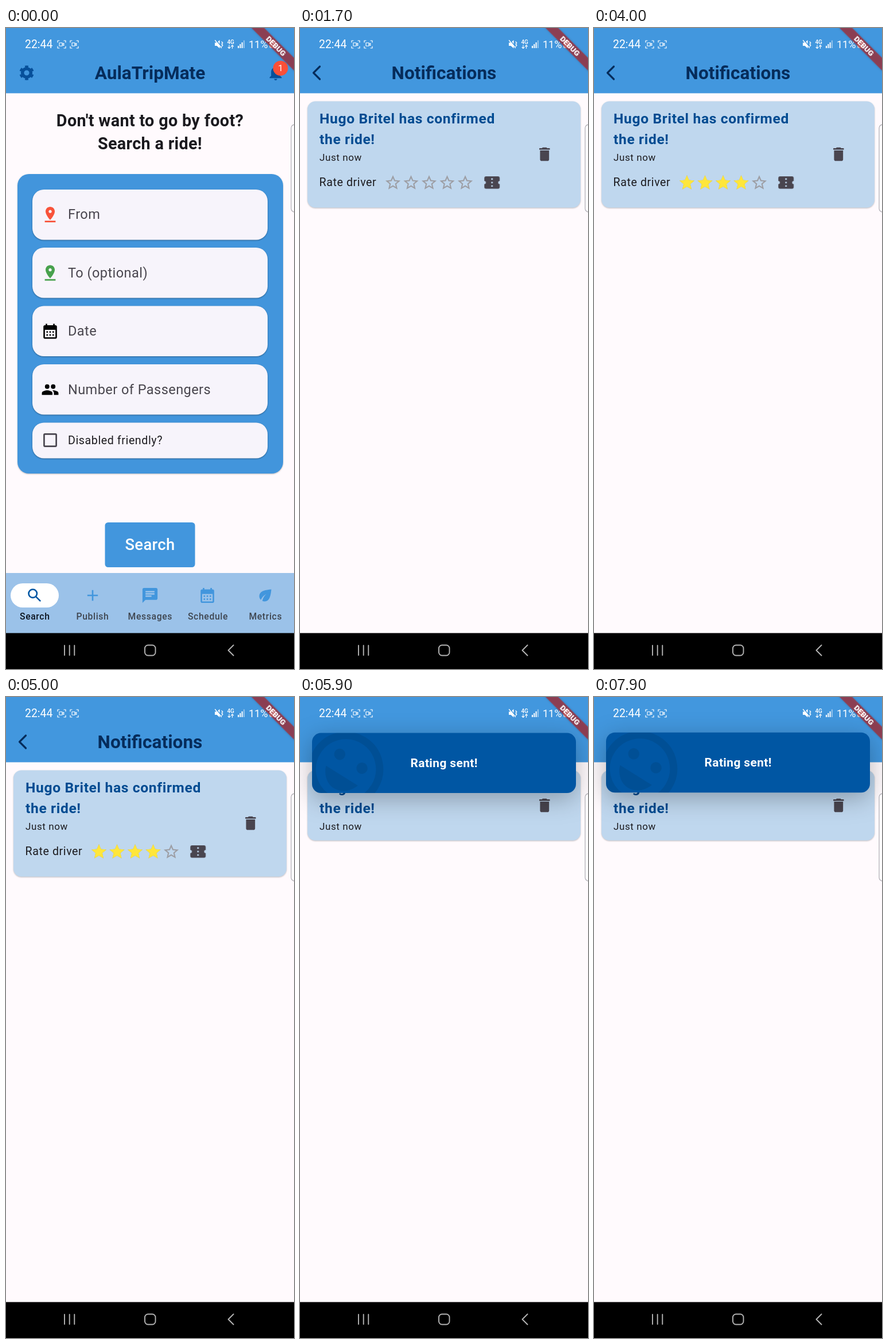
Recreate the animation shown at these times as an HTML page. Size 502 px wide and 1115 px high, loop 8000 ms.

```html
<!DOCTYPE html>
<html lang="en">
<head>
<meta charset="utf-8">
<title>Ride notifications</title>
<style>
html, body { margin: 0; width: 100%; height: 100%; overflow: hidden; background: #fffafd; }
svg { display: block; }
text { font-family: Roboto, sans-serif; white-space: pre; }
.mid { text-anchor: middle; }
.page { fill: #fffafd; }
.title { font-size: 31.6px; font-weight: 700; fill: #062c5b; }
.lead { font-size: 28.75px; font-weight: 700; fill: #1b1a1f; letter-spacing: .33px; }
.label { font-size: 23.5px; fill: #49464e; letter-spacing: .45px; }
.tab { font-size: 15.7px; font-weight: 500; fill: #3f4650; letter-spacing: .65px; }
.news { font-size: 24.6px; font-weight: 700; fill: #004b91; letter-spacing: .65px; }
.note { font-size: 19.6px; fill: #1c1b1f; letter-spacing: .6px; }
.when { font-size: 17px; fill: #1c1b1f; letter-spacing: .6px; }
.field { fill: #f7f4fb; filter: drop-shadow(0 1.3px 1.2px rgba(0,0,0,.35)); }
.card { fill: #bfd7ee; filter: drop-shadow(0 1px 1.2px rgba(0,0,0,.25)); }
.line { fill: none; stroke-linecap: round; stroke-linejoin: round; }

#ripple, #notices, #rated, #fullCard, #shortCard { animation: 8s infinite step-end; }
#ripple { animation-name: ripple; animation-timing-function: linear; opacity: 0; }
#notices { animation-name: enter; transform-origin: 251px 557px; }
#rated { animation-name: rated; }
#fullCard { animation-name: full; }
#shortCard { animation-name: short; }
#blink { animation: blink 1s infinite step-end; }
@keyframes ripple { 0%, 15% { opacity: 0; } 16.2%, 18% { opacity: 1; } 20%, 100% { opacity: 0; } }
@keyframes enter {
  0% { opacity: 0; transform: scale(.85); animation-timing-function: step-end; }
  17.6% { opacity: 0; transform: scale(.85); animation-timing-function: cubic-bezier(.05,.7,.1,1); }
  21.1%, 100% { opacity: 1; transform: none; }
}
@keyframes rated { 0% { opacity: 0; } 32.4%, 100% { opacity: 1; } }
@keyframes full { 0% { opacity: 1; } 66.1%, 100% { opacity: 0; } }
@keyframes short { 0% { opacity: 0; } 69.9%, 100% { opacity: 1; } }
@keyframes blink { 0% { opacity: 1; } 10% { opacity: 0; } 60%, 100% { opacity: 1; } }
</style>
</head>
<body>
<svg width="502" height="1115" viewBox="0 0 502 1115">
<defs>
  <g id="gear" fill="none" stroke="#07509a" transform="scale(1.31) translate(-12 -12)">
    <circle cx="12" cy="12" r="5.6" stroke-width="4.2"/>
    <circle cx="12" cy="12" r="8.1" stroke-width="3.2" pathLength="12" stroke-dasharray="1 1" transform="rotate(-105 12 12)"/>
  </g>
  <path id="bell" transform="scale(1.31) translate(-12 -12)" d="M12 22c1.1 0 2-.9 2-2h-4c0 1.1.89 2 2 2zm6-6v-5c0-3.07-1.64-5.64-4.5-6.32V4c0-.83-.67-1.5-1.5-1.5s-1.5.67-1.5 1.5v.68C7.63 5.36 6 7.92 6 11v5l-2 2v1h16v-1l-2-2z"/>
  <path id="pin" transform="scale(1.34) translate(-12 -12)" d="M18 8c0-3.31-2.69-6-6-6S6 4.69 6 8c0 4.5 6 11 6 11s6-6.5 6-11zm-8 0c0-1.1.9-2 2-2s2 .9 2 2-.89 2-2 2-2-.9-2-2zM5 20v2h14v-2H5z"/>
  <path id="calendar" transform="scale(1.31) translate(-12 -12)" d="M19 4h-1V2h-2v2H8V2H6v2H5c-1.1 0-2 .9-2 2v14c0 1.1.9 2 2 2h14c1.1 0 2-.9 2-2V6c0-1.1-.9-2-2-2zm0 16H5V10h14zM9 14H7v-2h2zm4 0h-2v-2h2zm4 0h-2v-2h2zm-8 4H7v-2h2zm4 0h-2v-2h2zm4 0h-2v-2h2z"/>
  <path id="people" transform="scale(1.31) translate(-12 -12)" d="M16 11a3 3 0 1 0 0-6 3 3 0 0 0 0 6zm-8 0a3 3 0 1 0 0-6 3 3 0 0 0 0 6zm0 2c-2.33 0-7 1.17-7 3.5V19h14v-2.5c0-2.33-4.67-3.5-7-3.5zm8 0c-.29 0-.62.02-.97.05 1.16.84 1.97 1.97 1.97 3.45V19h6v-2.5c0-2.33-4.67-3.5-7-3.5z"/>
  <path id="lens" class="line" stroke="#0056a3" stroke-width="2" transform="scale(1.31) translate(-12 -12)" d="M4 9.5a5.5 5.5 0 1 0 11 0a5.5 5.5 0 1 0-11 0M14 14l5.2 5.2"/>
  <path id="plus" transform="scale(1.31) translate(-12 -12)" d="M19 13h-6v6h-2v-6H5v-2h6V5h2v6h6z"/>
  <path id="chat" transform="scale(1.31) translate(-12 -12)" d="M20 2H4c-1.1 0-2 .9-2 2v18l4-4h14c1.1 0 2-.9 2-2V4c0-1.1-.9-2-2-2zM6 9h12v2H6zm8 5H6v-2h8zm4-6H6V6h12z"/>
  <path id="leaf" transform="scale(1.31) translate(-12 -12)" d="M6.05 8.05c-2.73 2.73-2.73 7.15-.02 9.88 1.47-3.4 4.09-6.24 7.36-7.93-2.77 2.34-4.71 5.61-5.39 9.32 2.6 1.23 5.8.78 7.95-1.37C19.43 14.47 20 4 20 4S9.53 4.57 6.05 8.05z"/>
  <path id="bin" fill="#49454f" transform="scale(1.31) translate(-12 -12)" d="M6 19c0 1.1.9 2 2 2h8c1.1 0 2-.9 2-2V7H6zM19 4h-3.5l-1-1h-5l-1 1H5v2h14z"/>
  <path id="ticket" fill="#49454f" transform="scale(1.34) translate(-12 -12)" d="M22 10V6c0-1.1-.9-2-2-2H4c-1.1 0-2 .9-2 2v4a2 2 0 0 1 0 4v4c0 1.1.9 2 2 2h16c1.1 0 2-.9 2-2v-4a2 2 0 0 1 0-4zm-9 7.5h-2v-2h2zm0-4.5h-2v-2h2zm0-4.5h-2v-2h2z"/>
  <path id="star" transform="scale(1.31) translate(-12 -12)" d="M12 17.27L18.18 21l-1.64-7.03L22 9.24l-7.19-.61L12 2 9.19 8.63 2 9.24l5.46 4.73L5.82 21z"/>
  <path id="starLine" transform="scale(1.31) translate(-12 -12)" d="M22 9.24l-7.19-.62L12 2 9.19 8.63 2 9.24l5.46 4.73L5.82 21 12 17.27 18.18 21l-1.63-7.03zM12 15.4l-3.76 2.27 1-4.28-3.32-2.88 4.38-.38L12 6.1l1.71 4.04 4.38.38-3.32 2.88 1 4.28z"/>
  <path id="corners" class="line" stroke="#fff" stroke-width="1.2" d="M-7-3.5V-6.5H-4M4-6.5H7V-3.5M7 3.5V6.5H4M-4 6.5H-7V3.5"/>
  <path id="camera" class="line" stroke="#fff" stroke-width="1.1" d="M-4-2.7H1V2.7H-4zM1-.5L3.8-2V2L1 .5"/>
  <g id="news">
    <text class="news" x="34" y="166">Hugo Britel has confirmed</text>
    <text class="news" x="34" y="202">the ride!</text>
    <text class="when" x="34" y="231">Just now</text>
  </g>
  <clipPath id="snackClip"><rect width="460" height="104.5" rx="15.5"/></clipPath>
</defs>

<g id="search">
  <rect class="page" width="502" height="1115"/>
  <rect width="502" height="113.5" fill="#4297de"/>
  <use href="#gear" x="36" y="78"/>
  <text class="title mid" x="251" y="89">AulaTripMate</text>
  <circle id="ripple" cx="470" cy="78" r="25" fill="#003" fill-opacity=".07"/>
  <use href="#bell" x="470" y="78" fill="#07509a"/>
  <circle cx="478.5" cy="70" r="13" fill="#fb5038"/>
  <text class="mid" x="478.5" y="75" font-size="15.5" fill="#fff">1</text>

  <text class="lead mid" x="251" y="171">Don't want to go by foot?</text>
  <text class="lead mid" x="251" y="211">Search a ride!</text>

  <rect x="20" y="254" width="463" height="521" rx="20" fill="#4295dc" style="filter:drop-shadow(0 1px 1px rgba(0,0,0,.25))"/>
  <g class="field">
    <rect x="46" y="281" width="410" height="87.5" rx="20"/>
    <rect x="46" y="382" width="410" height="87.5" rx="20"/>
    <rect x="46" y="483.5" width="410" height="87.5" rx="20"/>
    <rect x="46" y="585" width="410" height="87.5" rx="20"/>
    <rect x="46" y="686.5" width="410" height="62" rx="20"/>
  </g>
  <use href="#pin" x="77" y="324.5" fill="#f8533a"/>
  <use href="#pin" x="77" y="426" fill="#48a14d"/>
  <use href="#calendar" x="77" y="527.5"/>
  <use href="#people" x="77" y="629"/>
  <rect x="66.4" y="706.4" width="21.2" height="21.2" rx="1.5" fill="none" stroke="#49454f" stroke-width="2.7"/>
  <text class="label" x="108" y="332">From</text>
  <text class="label" x="108" y="434">To (optional)</text>
  <text class="label" x="108" y="535">Date</text>
  <text class="label" x="108" y="637">Number of Passengers</text>
  <text class="note" x="108" y="724">Disabled friendly?</text>

  <rect x="172.5" y="860" width="157" height="78" rx="5.5" fill="#4296dd"/>
  <text class="mid" x="251" y="908" font-size="27.4" font-weight="500" fill="#fff" letter-spacing=".33">Search</text>

  <rect y="948" width="502" height="105" fill="#9bc2e9"/>
  <rect x="8" y="966" width="84" height="42" rx="21" fill="#fff"/>
  <use href="#lens" x="50" y="987"/>
  <g fill="#4296dd">
    <use href="#plus" x="151" y="987"/>
    <use href="#chat" x="251" y="987"/>
    <use href="#calendar" x="351" y="987"/>
    <use href="#leaf" x="452" y="987"/>
  </g>
  <g class="mid">
    <text class="tab" x="50.3" y="1029" style="fill:#0c1420">Search</text>
    <text class="tab" x="151" y="1029">Publish</text>
    <text class="tab" x="251.3" y="1029">Messages</text>
    <text class="tab" x="352" y="1029">Schedule</text>
    <text class="tab" x="452.3" y="1029">Metrics</text>
  </g>
</g>

<g id="notices">
  <rect class="page" width="502" height="1115"/>
  <rect width="502" height="113.5" fill="#4297de"/>
  <path class="line" d="M34.5 67L23.5 78l11 11" stroke="#062c5b" stroke-width="3.2"/>
  <text class="title mid" x="251" y="89">Notifications</text>

  <g id="fullCard">
    <rect class="card" x="13" y="127.5" width="476" height="185" rx="14"/>
    <use href="#news"/>
    <use href="#bin" x="426.3" y="219.5"/>
    <text class="note" x="33.5" y="275">Rate driver</text>
    <g fill="#9d9ea4">
      <use href="#starLine" x="162" y="269"/>
      <use href="#starLine" x="193.5" y="269"/>
      <use href="#starLine" x="225" y="269"/>
      <use href="#starLine" x="256.5" y="269"/>
      <use href="#starLine" x="288" y="269"/>
    </g>
    <g id="rated" fill="#ffe63b">
      <use href="#star" x="162" y="269"/>
      <use href="#star" x="193.5" y="269"/>
      <use href="#star" x="225" y="269"/>
      <use href="#star" x="256.5" y="269"/>
    </g>
    <use href="#ticket" x="334.7" y="268.8"/>
  </g>

  <g id="shortCard">
    <rect class="card" x="13" y="127.5" width="476" height="122" rx="14"/>
    <use href="#news"/>
    <use href="#bin" x="426.3" y="188.5"/>
  </g>
</g>

<g id="snack" visibility="hidden">
  <g transform="translate(21 61.7)">
    <rect width="460" height="104.5" rx="15.5" fill="#0056a3" style="filter:drop-shadow(0 10.5px 21px rgba(0,0,0,.28))"/>
    <g clip-path="url(#snackClip)">
      <g transform="translate(59 63) rotate(32) scale(6.53)" fill="#000" fill-opacity=".085">
        <circle r="9" fill="none" stroke="#000" stroke-opacity=".085" stroke-width="2"/>
        <circle cx="-3.5" cy="-2.5" r="1.5"/>
        <circle cx="3.5" cy="-2.5" r="1.5"/>
        <path d="M0 6c2.28 0 4.22-1.66 5-4H-5c.78 2.34 2.72 4 5 4z"/>
      </g>
    </g>
    <text class="mid" x="230.2" y="59.6" font-size="20.9" font-weight="600" fill="#fff" letter-spacing=".4">Rating sent!</text>
  </g>
</g>

<g id="system">
  <g fill="#fff">
    <text x="33" y="35" font-size="19.4">22:44</text>
    <use href="#corners" x="97" y="28.5"/>
    <g id="blink"><use href="#camera" x="97" y="28.5"/></g>
    <use href="#corners" x="119" y="28.5"/>
    <use href="#camera" x="119" y="28.5"/>
    <path d="M364 25.5h3.5l5-4.5v14.5l-5-4.5H364z"/>
    <path class="line" d="M365.5 20.5l11 13" stroke="#4297de" stroke-width="1.5"/>
    <path class="line" d="M364.5 21.5l11 13M376 24l1.8 2-1.8 2 1.8 2-1.8 2" stroke="#fff" stroke-width="1.3"/>
    <text class="mid" x="391.7" y="27.5" font-size="10" font-weight="500">4G</text>
    <path class="line" d="M389 30v5.5l-2-2m2 2l2-2M394.5 35.5v-5.5l-2 2m2-2l2 2" stroke="#fff" stroke-width="1.1"/>
    <path d="M404 31h2v4h-2zM407.3 28h2v7h-2zM410.6 25h2v10h-2z"/>
    <path d="M413.9 21.5h2V35h-2z" opacity=".45"/>
    <text x="423" y="35" font-size="18">11%</text>
    <rect x="459" y="21" width="11" height="14" rx="3" opacity=".75"/>
  </g>
  <g transform="translate(502 0) rotate(45)">
    <rect x="-80" y="36.6" width="160" height="15.7" fill="#b71c1c" fill-opacity=".66" style="filter:drop-shadow(0 0 2px rgba(0,0,0,.25))"/>
    <text class="mid" y="49.2" font-size="13.3" font-weight="900" fill="#fff">DEBUG</text>
  </g>
  <rect x="497" y="168" width="20" height="152" rx="6" fill="#fff" fill-opacity=".6" stroke="#b3b1b8" stroke-width="1.3"/>
  <rect y="1052.5" width="502" height="63" fill="#000"/>
  <g class="line" stroke="#b4b4b4" stroke-width="1.9">
    <path d="M102 1074v17M110.7 1074v17M119.3 1074v17M396.5 1073.5l-9 9 9 9"/>
    <rect x="242" y="1073.5" width="18.5" height="18" rx="5.5"/>
  </g>
</g>
</svg>
<script>
const LOOP = 8000, START = 5284, BOUNCE = 1200, TRAVEL = 145, STEPS = 72;
const elasticOut = t => t <= 0 ? 0 : t >= 1 ? 1 : 1 + 2 ** (-10 * t) * Math.sin((t - .1) * 5 * Math.PI);
const pose = (time, y, visibility = 'visible') =>
  ({ offset: time / LOOP, transform: `translateY(${y}px)`, visibility });

const frames = [pose(0, -TRAVEL, 'hidden'), pose(START, -TRAVEL, 'hidden')];
for (let i = 0; i <= STEPS; i++) {
  const t = i / STEPS;
  frames.push(pose(START + t * BOUNCE, (elasticOut(t) - 1) * TRAVEL));
}
frames.push(pose(LOOP, 0));
document.getElementById('snack').animate(frames, { duration: LOOP, iterations: Infinity });
</script>
</body>
</html>
```
